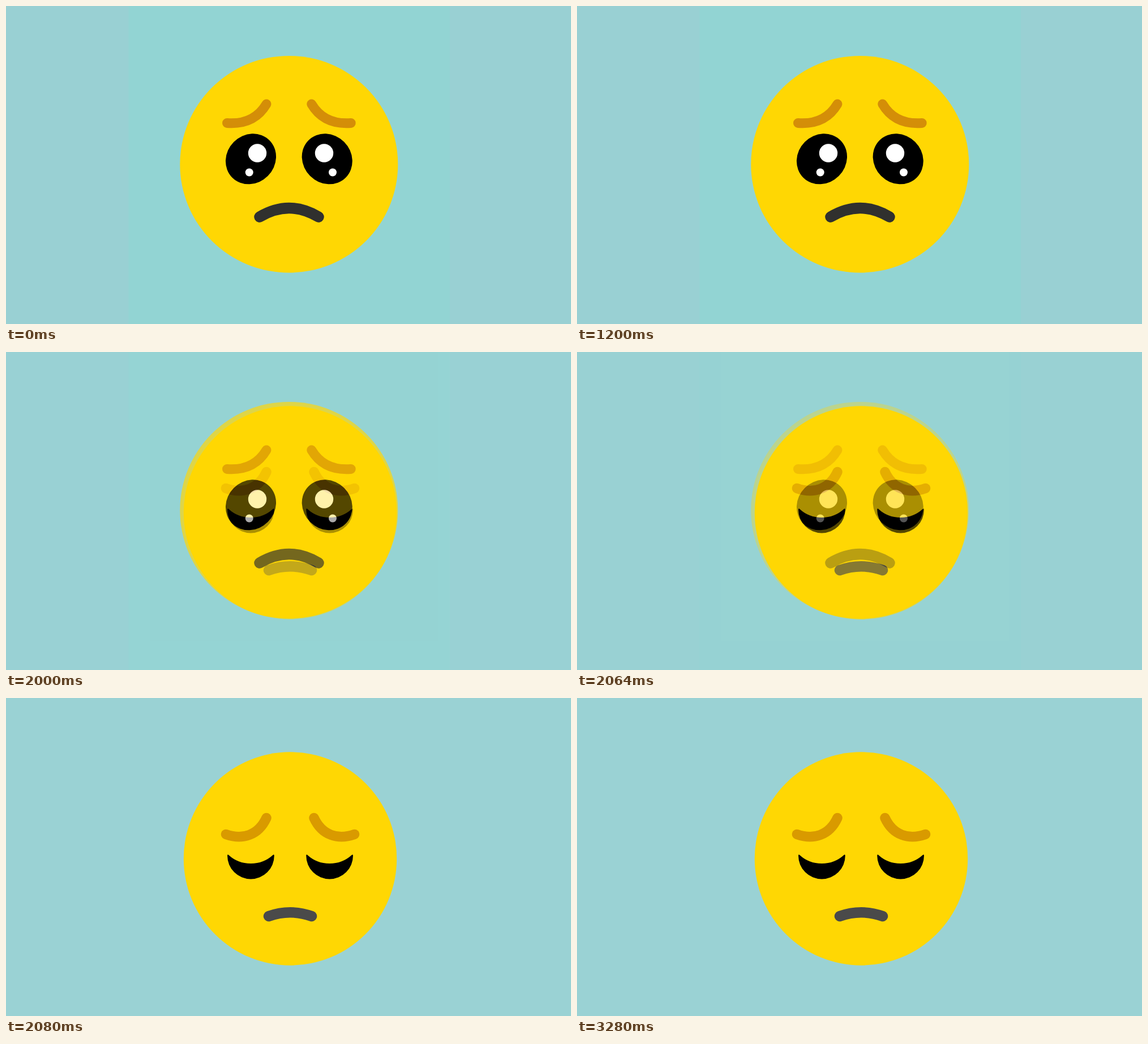
An HTML page without scripts for the animation above (4080 ms loop, 998 px wide and 561 px high).

```html
<!DOCTYPE html>
<html lang="en">
<head>
<meta charset="utf-8">
<title>Sad face closing its eyes</title>
<style>
  html, body { margin: 0; width: 100%; height: 100%; overflow: hidden; background: #9ad2d4; }
  svg { display: block; width: 100%; height: 100%; }
  .line { fill: none; stroke-linecap: round; }
  .face { fill: #ffd703; }
  .shine { fill: #fff; }
  .closed { animation: fade 4080ms step-end infinite; }

  /* Two short blend steps of 40 ms, then a hard cut back at the loop. */
  @keyframes fade {
    0% { opacity: 0; }
    49.0196% { opacity: .3333; }
    50% { opacity: .6667; }
    50.9804%, 100% { opacity: 1; }
  }
</style>
</head>
<body>
<svg viewBox="0 0 998 561">
  <defs>
    <path id="openBrow" class="line" stroke="#d48e08" stroke-width="17" d="M390.5 206.5Q438 210 460 173"/>
    <ellipse id="openEye" cx="432.5" cy="269.8" rx="46.5" ry="42.5" transform="rotate(-45 432.5 269.8)"/>
    <g id="shines" class="shine">
      <circle cx="444" cy="259.5" r="16.2"/>
      <circle cx="429.7" cy="293.5" r="7"/>
    </g>
    <path id="closedBrow" class="line" stroke="#d99a00" stroke-width="17.5" d="M388.5 240.5C418 251 446 242 460 211.5"/>
    <path id="lid" d="M391 278A41.4 41.5 0 0 0 473.8 278Q473.5 275 471.5 277Q455 292 432.4 292Q409.500 292 393.300 277Q391.200 275 391 278Z"/>
  </defs>

  <g class="open">
    <rect width="998" height="561" fill="#99d0d3"/>
    <rect x="216.500" width="567.500" height="561" fill="#92d4d3"/>
    <ellipse class="face" cx="499.8" cy="279.2" rx="192.500" ry="191.300"/>
    <use href="#openBrow"/>
    <use href="#openBrow" transform="matrix(-1 0 0 1 999.7 0)"/>
    <use href="#openEye"/>
    <use href="#openEye" transform="matrix(-1 0 0 1 999.7 0)"/>
    <use href="#shines"/>
    <g class="shine">
      <circle cx="562" cy="259.5" r="16.2"/>
      <circle cx="577" cy="293.5" r="7"/>
    </g>
    <path class="line" stroke="#30302e" stroke-width="19.5" d="M448 372Q500 341 552 372"/>
  </g>

  <g class="closed">
    <rect width="998" height="561" fill="#9ad2d4"/>
    <circle class="face" cx="502" cy="283.5" r="188.2"/>
    <use href="#closedBrow"/>
    <use href="#closedBrow" transform="matrix(-1 0 0 1 1004 0)"/>
    <use href="#lid"/>
    <use href="#lid" x="139.2"/>
    <path class="line" stroke="#4a4a4a" stroke-width="18.5" d="M464 385Q502 371.5 540 385"/>
  </g>
</svg>
</body>
</html>
```
